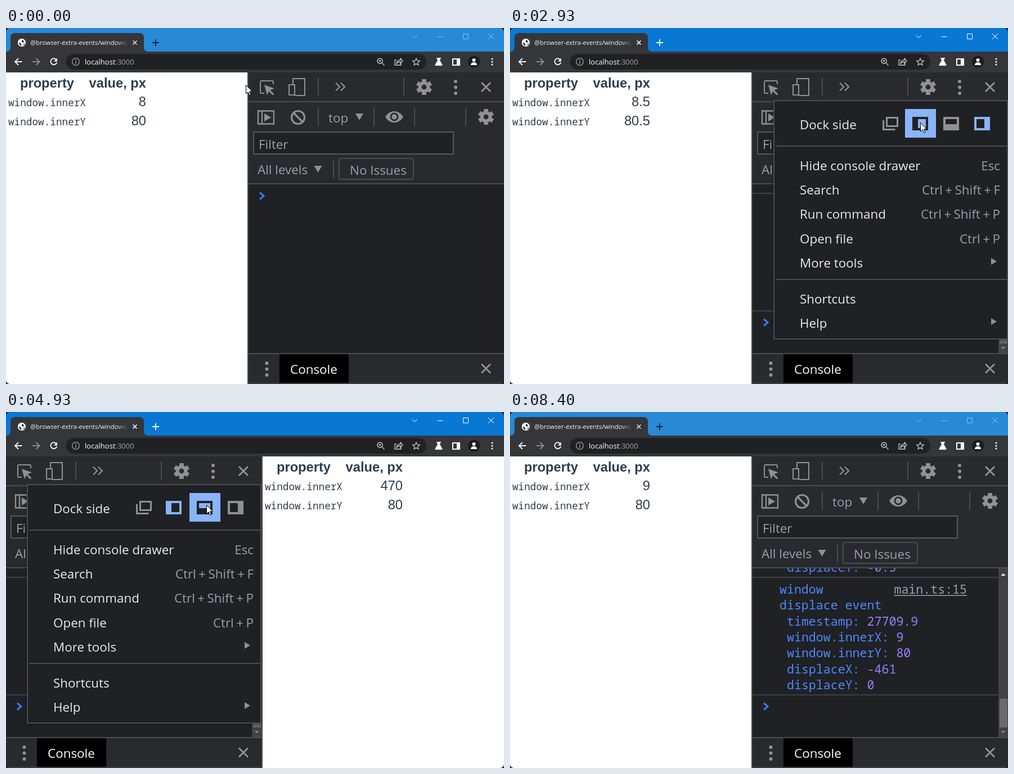
Write an HTML page with a canvas that moves like this. It is 885 px wide and 633 px high and loops after 8.47 s.

```html
<!DOCTYPE html>
<html lang="en">
<head>
<meta charset="utf-8">
<title>Window displace event</title>
<style>
html, body { margin: 0; width: 100%; height: 100%; overflow: hidden; background: #0c2440; }
canvas { display: block; }
</style>
</head>
<body>
<canvas id="stage" width="885" height="633"></canvas>
<script>
const ctx = document.getElementById('stage').getContext('2d');
const W = 885, H = 633, LOOP = 8470, STEP = 200 / 3;
const LAST = Math.floor(LOOP / STEP) - 1;

const BAR = '#35363a', TOOL = '#292a2d', DARK = '#202124', LINE = '#4a4c50';
const ICON = '#919191', GREY = '#9aa0a6', WHITE = '#e8eaed', SKY = '#8ab4f8';
const BLUE = '#4d88ff', VIOLET = '#9980ff', INK = '#2c3e50';

const ui = size => `${size}px "Open Sans", "Noto Sans", sans-serif`;
const mono = size => `${size}px "Noto Sans Mono", "DejaVu Sans Mono", monospace`;
const arial = weight => `${weight} 23.7px "Liberation Sans", Arial, sans-serif`;
const UI = ui(22.4), MONO = mono(21.6);

// Pointer path: time, x, y
const pointer = [
  [0, 426, 101], [130, 366, 155], [1600, 366, 155], [2330, 796, 104], [2530, 799, 106],
  [2930, 729, 168], [3070, 729, 168], [3930, 382, 107], [4000, 382, 107], [4270, 370, 95],
  [4400, 368, 98], [4930, 356, 165], [5200, 356, 165], [5400, 477, 190], [5670, 477, 190],
  [6200, 815, 412], [6330, 805, 395], [6400, 805, 395], [6670, 800, 368], [6930, 812, 381],
  [7000, 812, 381], [7070, 815, 381], [7200, 815, 381], [7730, 359, 303], [7800, 359, 303],
  [8070, 100, 634], [LOOP, 100, 634]
];

// Logged events: time shown, timestamp, innerX, innerY, displaceX, displaceY
const events = [
  [1070, 23538.9, 8.5, 104.5, 0.5, 24.5],
  [1130, 23605.3, 8.5, 112, 0, 7.5],
  [1600, 23971.6, 8.5, 89.5, 0, -22.5],
  [1600, 24038.4, 8.5, 82, 0, -7.5],
  [1600, 24092.2, 8.5, 80.5, 0, -1.5],
  [3130, 25560.7, 470, 80, 461.5, -0.5],
  [5270, 27709.9, 9, 80, -461, 0]
];
const fields = ['timestamp', 'window.innerX', 'window.innerY', 'displaceX', 'displaceY'];

const within = (t, ...spans) => spans.some(([a, b]) => t >= a && t < b);

function rect(x, y, w, h, color) {
  ctx.fillStyle = color;
  ctx.fillRect(x, y, w, h);
}
function box(x, y, w, h, r, color, width) {
  ctx.beginPath();
  ctx.roundRect(x, y, w, h, r);
  paint(color, width);
}
function paint(color, width) {
  if (width) {
    ctx.strokeStyle = color;
    ctx.lineWidth = width;
    ctx.stroke();
  } else {
    ctx.fillStyle = color;
    ctx.fill();
  }
}
function path(d, color, width) {
  const p = new Path2D(d);
  ctx.strokeStyle = ctx.fillStyle = color;
  ctx.lineWidth = width || 0;
  width ? ctx.stroke(p) : ctx.fill(p);
}
function disc(x, y, r, color, width) {
  ctx.beginPath();
  ctx.arc(x, y, r, 0, 7);
  paint(color, width);
}
function text(s, x, y, color, font = UI, align = 'left') {
  ctx.font = font;
  ctx.fillStyle = color;
  ctx.textAlign = align;
  ctx.fillText(s, x, y);
}
function at(x, y, draw) {
  ctx.save();
  ctx.translate(x, y);
  draw();
  ctx.restore();
}
const cross = (x, y, r, color, w) =>
  path(`M${x - r} ${y - r}l${2 * r} ${2 * r}m0 ${-2 * r}l${-2 * r} ${2 * r}`, color, w);
const dots = (x, y, gap, r, color) => [-gap, 0, gap].forEach(d => disc(x, y + d, r, color));
const divider = (x, y) => rect(x - 1, y - 16, 2, 32, LINE);
const dropArrow = (x, y) => path(`M${x - 7} ${y - 6}h14l-7 12z`, ICON);

function gear(x, y) {
  at(x, y, () => {
    disc(0, 0, 7.4, ICON, 6);
    for (let i = 0; i < 6; i++) {
      ctx.rotate(Math.PI / 3);
      rect(-3.8, -14, 7.6, 5, ICON);
    }
  });
}

function pointerAt(t) {
  const i = pointer.findIndex(p => p[0] > t);
  const [t0, x0, y0] = pointer[i - 1], [t1, x1, y1] = pointer[i];
  const u = (t - t0) / (t1 - t0), e = u * u * (3 - 2 * u);
  return { x: Math.round(x0 + (x1 - x0) * e), y: Math.round(y0 + (y1 - y0) * e) };
}

function browser(active) {
  rect(0, 0, W, 42, active ? '#0878d4' : '#2889d6');
  rect(0, 42, W, 37, BAR);
  path('M0 42q8 0 8-8V17q0-8 8-8H237q8 0 8 8V34q0 8 8 8z', BAR);
  disc(28, 26, 7.2, '#f1f3f4');
  path('M23 25l4 3v4q-4-2-4-7zM28 21l4 2-1 3-3-1zM31 28h3l-2 3z', BAR);
  ctx.save();
  ctx.beginPath();
  ctx.rect(43, 12, 173, 28);
  ctx.clip();
  const fade = ctx.createLinearGradient(196, 0, 216, 0);
  fade.addColorStop(0, '#f5f6f7');
  fade.addColorStop(1, '#f5f6f700');
  text('@browser-extra-events/windowdisplace', 43, 30, fade, ui(11.2));
  ctx.restore();
  cross(229, 26, 3.5, active ? '#fff' : '#dadce0', 1.6);
  path('M260 26h12m-6-6v12', active ? '#fff' : '#14202c', 1.8);

  const c = active ? '#fff' : '#8fbfe8';
  path('M721 12.5l5 5 5-5M766.5 15.5h10M812.5 10.5h9v9h-9z', c, 1);
  cross(862, 15, 5, c, 1);

  path('M28.5 60H16m6-6l-6 6 6 6', '#f1f3f4', 1.8);
  path('M47 60h12.5m-6-6l6 6-6 6', '#8a8c90', 1.8);
  path('M89 56a5.5 5.5 0 1 0 1.3 5', '#f1f3f4', 1.9);
  path('M91 53.5v6h-6z', '#f1f3f4');
  box(107, 46, 640, 28, 14, DARK);
  disc(124, 60, 6.3, GREY, 1.3);
  rect(123.3, 59, 1.5, 4.5, GREY);
  rect(123.3, 56.3, 1.5, 1.5, GREY);
  text('localhost', 140, 65, '#fff', ui(13));
  text(':3000', 140 + ctx.measureText('localhost').width, 65, GREY, ui(13));

  const g = '#c4c7cb';
  disc(664.5, 58.5, 4.5, g, 1.5);
  path('M668 62l4.5 4.5M662.5 58.5h4m-2-2v4', g, 1.4);
  path('M694 57h-3v9h11v-4M694 63q1-6 7-6v-3l4 4.5-4 4.5v-3q-4 0-7 3z', g, 1.3);
  path('M729 54l1.8 4.2 4.5.4-3.4 3 1 4.4-3.9-2.4-3.9 2.4 1-4.4-3.4-3 4.5-.4z', g, 1.3);
  path('M765 53h8v1.5h-1.5v4l4 7q.5 1.5-1 1.5h-11q-1.5 0-1-1.5l4-7v-4H765z', '#fff');
  path('M794 55h12v11h-12z', '#fff', 2);
  rect(801, 55, 5, 11, '#fff');
  disc(831.5, 60, 10.5, '#1b1c1f');
  disc(831.5, 57, 3, '#fff');
  path('M826 66q0-5 5.5-5t5.5 5z', '#fff');
  dots(864, 60, 5, 1.6, '#f1f3f4');
}

function page(x, right, top, bottom, innerX, innerY, showSize) {
  rect(x, top, right - x, bottom - top, '#fff');
  at(x, top - 79, () => {
    text('property', 73, 105.5, INK, arial('bold'), 'center');
    text('value, px', 249, 105.5, INK, arial('bold'), 'right');
    [['window.innerX', innerX], ['window.innerY', innerY]].forEach(([name, value], i) => {
      text(name, 4, 139 + 34 * i, INK, mono(17.7));
      text(value, 249, 139 + 34 * i, INK, arial(''), 'right');
    });
  });
  if (showSize) {
    const css = px => +(Math.round(px / 1.479 * 1.5) / 1.5).toFixed(2) + 'px';
    text(`${css(right - x)} × ${css(bottom - top)}`, right - 6, top + 18, '#808080', ui(13.2), 'right');
  }
}

function inspectIcons() {
  path('M475 100V96q0-2-2-2H454q-2 0-2 2V114q0 2 2 2h5', ICON, 2);
  path('M459 101l18 6.5-7.5 3 7 7-2.5 2-7-7-3 7z', ICON);
  path('M510 100V90h21v30H513', ICON, 2);
  path('M503 101h10v18h-10z', ICON, 2);
}
function consoleIcons() {
  path('M448 147.5h28v23h-28zM455 147v24', ICON, 2.3);
  path('M459 152l12 7-12 7z', ICON);
  disc(519, 159, 11.5, ICON, 3.2);
  path('M511 151l16 16', ICON, 3.2);
  divider(555, 158);
  text('top', 573, 167.5, GREY);
  dropArrow(628, 158);
  divider(654, 158);
  path('M674 158C682 144.5 698 144.5 706 158C698 171.5 682 171.5 674 158Z', ICON);
  disc(690, 158, 7.5, TOOL);
  disc(690, 158, 4.7, ICON);
  divider(726, 158);
}
function noIssues(x, y) {
  box(x + 1, y + 1, 132, 37, 3, LINE, 2);
  text('No Issues', x + 20, y + 29.5, GREY);
}
const chevrons = x => path(`M${x} 97.5l7 7-7 7m9-14l7 7-7 7`, ICON, 2.2);

function scrollbar(x, w, top, bottom, y, h) {
  rect(x, top, w, bottom - top, '#424242');
  rect(x + 2, y, w - 3, h, '#6a6a6a');
}

function log(x0, x1, top, count) {
  const bottom = 578, view = bottom - top, total = 209 * count + 75;
  const end = Math.min(top + 209 * count, bottom - 75);
  const scrolls = total > view;
  const right = scrolls ? x1 - 17 : x1;
  rect(x0, top, x1 - x0, view, DARK);
  ctx.save();
  ctx.beginPath();
  ctx.rect(x0, top, x1 - x0, view);
  ctx.clip();
  events.slice(0, count).reverse().slice(0, 3).forEach((event, i) => {
    const y = end - 209 * i, row = n => y - 180 + 28.35 * n;
    rect(x0, y - 1, right - x0, 2, '#3d4044');
    rect(x0, y - 210, right - x0, 2, '#3d4044');
    text('window', x0 + 48, row(0), BLUE, MONO);
    text('displace event', x0 + 48, row(1), BLUE, MONO);
    const linkEnd = x1 - 73;
    text('main.ts:15', linkEnd, row(0), GREY, MONO, 'right');
    rect(linkEnd - 130, row(0) + 2.5, 130, 1.5, GREY);
    fields.forEach((name, n) => {
      text(name + ':', x0 + 61, row(n + 2), BLUE, MONO);
      text(event[n + 1], x0 + 61 + 12.96 * (name.length + 2), row(n + 2), VIOLET, MONO);
    });
  });
  path(`M${x0 + 20} ${end + 14.5}l7 6-7 6`, '#367cf1', 3);
  ctx.restore();
  if (scrolls) {
    const thumb = Math.max(18, (view - 36) * view / (total + 7));
    scrollbar(right, 17, top, bottom, bottom - 17 - thumb, thumb);
    path(`M${right + 4.5} ${top + 13}h8l-4-4z`, '#fff');
    path(`M${right + 4.5} ${bottom - 11}h8l-4 4z`, '#8a8a8a');
  }
}

function devtools(dock, off, count) {
  const low = dock === 'bottom';
  const x0 = dock === 'right' ? 431 : 0, x1 = dock === 'left' ? 454 : W;
  const top = low ? 339 : 79 + off, w = x1 - x0;
  const left = x0 - 431, right = x1 - W;
  const dy = low ? 260 : off, viewTop = low ? 497 : 278 + off;

  rect(x0, top, w, H - top, TOOL);
  at(0, dy, () => {
    at(left, low, inspectIcons);
    at(left, 0, () => divider(555, 104));
    if (low) {
      rect(276, 79, 130, 52, '#000');
      ['Elements', 'Console', 'Sources', 'Network'].forEach((name, i) =>
        text(name, [159, 299, 429, 558][i], 114.5, i === 1 ? '#fff' : GREY));
      chevrons(676);
    } else at(left, 0, () => chevrons(586));
    at(right, 0, () => {
      divider(707, 104);
      gear(743, 105);
      dots(799, 105.5, 10.5, 3, ICON);
      cross(853, 105, 8, ICON, 3);
    });
    rect(x0, 130, w, 2, LINE);

    at(left, 0, consoleIcons);
    at(right, 0, () => {
      divider(817, 158);
      gear(853, 158);
    });
    if (low) {
      rect(308, 138, 340, 40, DARK);
      path('M309 139h338v38H309z', LINE, 2);
      text('Filter', 318, 168.5, GREY);
      text('All levels', 668, 167.5, GREY);
      dropArrow(776, 158);
      noIssues(4, 190);
    } else at(left, 0, () => {
      rect(439, 184, 357, 40, DARK);
      path('M440 185h355v39H440z', '#55585b', 2);
      text('Filter', 449, 214.5, GREY);
      text('All levels', 447, 260, GREY);
      dropArrow(554.5, 251);
      divider(582, 251);
      noIssues(591, 231);
    });
  });
  rect(x0, viewTop - 2, w, 2, LINE);
  log(x0, x1, viewTop, count);

  rect(x0, 578, w, 55, TOOL);
  rect(x0, 578, w, 2, LINE);
  rect(x0 + 55, 580, 123, 51, '#000');
  rect(x0, 631, w, 1, LINE);
  dots(x0 + 32.5, 606.5, 10.5, 3, ICON);
  text('Console', x0 + 74, 614.5, '#fff');
  cross(x1 - 32, 605.5, 8, ICON, 3);

  if (low) rect(0, 337, W, 2, LINE);
  else rect(dock === 'left' ? 454 : 429, top, 2, H - top, LINE);
}

// Cut-out of each dock icon, inside its 28 x 24 frame
const holes = { left: [10, 4, 14, 16], bottom: [4, 4, 20, 9], right: [4, 4, 14, 16] };

function menu(dock, mouse) {
  const low = dock === 'bottom';
  const dx = { right: 0, left: -431, bottom: -18 }[dock], dy = low ? 209 : 0;
  at(dx, dy, () => {
    ctx.save();
    ctx.shadowColor = '#0005';
    ctx.shadowBlur = 6;
    ctx.shadowOffsetY = 2;
    rect(468, 128, 417, 426, DARK);
    ctx.restore();
    path('M469 129h415v424h-415z', LINE, 2);
    text('Dock side', 515, 179.5, WHITE);

    ['undock', 'left', 'bottom', 'right'].forEach((name, i) => {
      const cx = [676, 729, 784, 839][i];
      const hover = Math.abs(mouse.x - dx - cx) < 27 && Math.abs(mouse.y - dy - 169) < 25;
      const back = hover ? SKY : DARK;
      const color = hover ? DARK : name === dock ? SKY : ICON;
      if (hover) rect(cx - 27, 144, 55, 51, SKY);
      at(cx - 14, 158, () => {
        if (name === 'undock') {
          path('M7.5 1.5h19v15h-19z', color, 3);
          path('M1.5 6v16.5h21', color, 3);
        } else {
          rect(0, 0, 28, 24, color);
          rect(...holes[name], back);
        }
      });
    });

    rect(472, 209, 411, 2, LINE);
    rect(472, 446, 411, 2, LINE);
    const keys = s => s.replace(/ /g, '\u2009');
    [['Hide console drawer', 'Esc'], ['Search', 'Ctrl + Shift + F'], ['Run command', 'Ctrl + Shift + P'],
     ['Open file', 'Ctrl + P'], ['More tools'], ['Shortcuts'], ['Help']].forEach(([name, key], i) => {
      const y = 252.5 + 43.4 * i + (i > 4 ? 20 : 0);
      text(name, 515, y, WHITE);
      if (key) text(keys(key), 871, y, GREY, UI, 'right');
      else if (name !== 'Shortcuts') path(`M855 ${y - 17}l10 6-10 6z`, ICON);
    });
  });
  if (low) {
    scrollbar(866, 19, 339, H, 356, 181);
    path('M871 350h8l-4-4z', '#8a8a8a');
    path('M871 622h8l-4 4z', '#fff');
  }
}

function arrow({ x, y }) {
  at(x + .5, y + .5, () => {
    const d = 'M0 0V15.5L3.6 12.2 6.2 18 8.6 17 6.1 11.4H11z';
    path(d, '#fff');
    path(d, '#000', 1);
  });
}

function draw(t) {
  const dock = within(t, [3070, 5200]) ? 'left' : within(t, [5200, 7270]) ? 'bottom' : 'right';
  // Extra toolbar that pushes the content down for a moment
  const off = within(t, [1000, 1070]) ? 24.5 : within(t, [1070, 1470]) ? 32 :
    within(t, [1470, 1530]) ? 9.5 : within(t, [1530, 1600]) ? 2 : 0;
  const gap = within(t, [1470, 1530]) ? 22 : within(t, [1530, 1600]) ? 7 : 0;
  const innerX = t < 1000 ? 8 : t < 3070 ? 8.5 : t < 5200 ? 470 : 9;
  const innerY = 80 + (within(t, [1600, 3070]) ? 0.5 : off);
  const count = events.filter(e => t >= e[0]).length;
  const mouse = pointerAt(t);

  ctx.clearRect(0, 0, W, H);
  ctx.save();
  ctx.beginPath();
  ctx.roundRect(0, 0, W, H, 7);
  ctx.clip();
  rect(0, 0, W, H, DARK);
  browser(within(t, [270, 8400]));
  rect(0, 79, W, off, BAR);
  page(dock === 'left' ? 456 : 0, dock === 'right' ? 429 : W, 79 + off,
    dock === 'bottom' ? 337 : H - gap, innerX, innerY,
    within(t, [1000, 2600], [5200, 6200], [7270, 8270]));
  devtools(dock, off, count);
  if (within(t, [2530, 3070], [4400, 5200], [6670, 7270])) menu(dock, mouse);
  arrow(mouse);
  ctx.restore();
}

// The picture advances 15 times a second; times are kept to 10 ms
function tick() {
  const step = Math.min(LAST, Math.floor((performance.now() % LOOP + 4) / STEP));
  draw(10 * Math.round(step * STEP / 10));
  requestAnimationFrame(tick);
}
tick();
</script>
</body>
</html>
```
